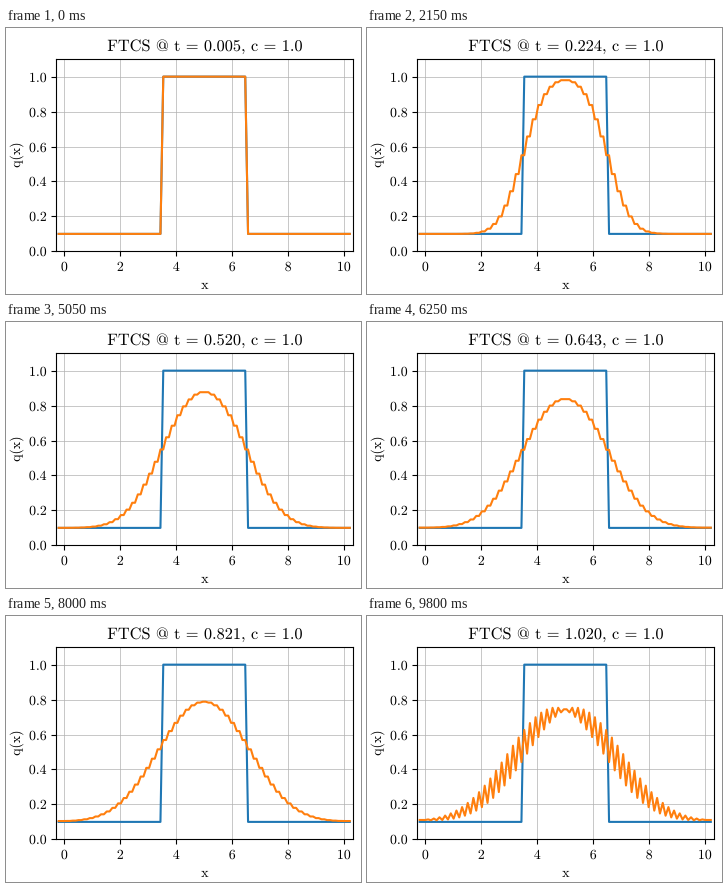
Animation, 355 px wide and 266 px high, one loop 9850 ms. Source, as a matplotlib script:

```python
import numpy as np
import matplotlib.pyplot as plt
from matplotlib.animation import FuncAnimation
from matplotlib.patches import PathPatch
from matplotlib.textpath import TextPath
from matplotlib.transforms import Affine2D, IdentityTransform

plt.rcParams["mathtext.fontset"] = "cm"

W, H, DPI = 355, 266, 100
LEFT, RIGHT, TOP, BOTTOM = 50.3, 347.4, 31.17, 223.37
X_ZERO, X_UNIT = 58.35, 27.98
Y_UNIT = (BOTTOM - TOP) / 1.1
MID_X, MID_Y = (LEFT + RIGHT) / 2, (TOP + BOTTOM) / 2
FRAMES, INTERVAL = 197, 50

# Diffusion of a square pulse, two ghost cells on each side
N, GHOST, C = 100, 2, 1.0
DX = 10 / (N - 1)
DT = 0.5 * DX**2 / C


def step(q, dt):
    """One forward-time, centred-space step with zero-gradient ends."""
    inner = q[GHOST:-GHOST]
    left, right = q[GHOST - 1:-GHOST - 1], q[GHOST + 1:N + GHOST + 1]
    new = inner + C * dt / DX**2 * (left - 2 * inner + right)
    return np.pad(new, GHOST, mode="edge")


def solve(q):
    """Profiles and times; the final step is four times too long."""
    profiles, times = [q], [DT]
    for n in range(1, FRAMES):
        dt = 4 * DT if n == FRAMES - 1 else DT
        profiles.append(step(profiles[-1], dt))
        times.append(times[-1] + dt)
    return profiles, times


def roman(text):
    """Upright maths text with normal word spacing."""
    text = text.replace(" = ", r"\hspace{0.18}=\hspace{0.18}")
    text = text.replace(", ", r",\hspace{0.18}")
    text = text.replace(" ", r"\hspace{0.38}")
    return rf"$\mathrm{{{text}}}$"


def text_path(x, y, text, size=13.84, anchor=0.5, angle=0):
    """Outline of text with its baseline at pixel (x, y) from the top left."""
    path = TextPath((0, 0), roman(text), size=size)
    box = path.get_extents()
    shift = -box.x0 - anchor * box.width
    place = Affine2D().translate(shift, 0).rotate_deg(angle).translate(x, H - y)
    return path.transformed(place)


def label(*args, **kw):
    patch = PathPatch(text_path(*args, **kw), facecolor="black", lw=0,
                      snap=False, transform=IdentityTransform())
    return fig.add_artist(patch)


def title_path(t):
    return text_path(MID_X, 23, f"FTCS @ t = {t:.3f}, c = {C:.1f}", size=16.3)


x = (np.arange(N + 2 * GHOST) - GHOST) * DX
start = np.where((x > 3.5) & (x < 6.5), 1.0, 0.1)
profiles, times = solve(start)

fig = plt.figure(figsize=(W / DPI, H / DPI), dpi=DPI, facecolor="white")
ax = fig.add_axes([LEFT / W, 1 - BOTTOM / H,
                   (RIGHT - LEFT) / W, (BOTTOM - TOP) / H])
ax.set_xlim((LEFT - X_ZERO) / X_UNIT, (RIGHT - X_ZERO) / X_UNIT)
ax.set_ylim(0, 1.1)
x_ticks, y_ticks = range(0, 11, 2), np.arange(6) * 0.2
ax.set_xticks(x_ticks)
ax.set_yticks(y_ticks)
ax.tick_params(labelbottom=False, labelleft=False)
ax.grid(True, lw=0.5)

for v in x_ticks:
    label(X_ZERO + X_UNIT * v, 243, str(v))
for v in y_ticks:
    label(40.1, round(BOTTOM - Y_UNIT * v + 5), f"{v:.1f}", anchor=1)
label(MID_X, 261, "x")
label(14, MID_Y + 0.3, "q(x)", angle=90)
title = label(MID_X, 23, "FTCS", size=16.3)

ax.plot(x, start, color="tab:blue", lw=1.5)
curve, = ax.plot(x, start, color="tab:orange", lw=1.5)


def update(n):
    curve.set_ydata(profiles[n])
    title.set_path(title_path(times[n]))
    return curve, title


anim = FuncAnimation(fig, update, frames=FRAMES, interval=INTERVAL,
                     repeat=True, repeat_delay=0)
plt.show()
```
